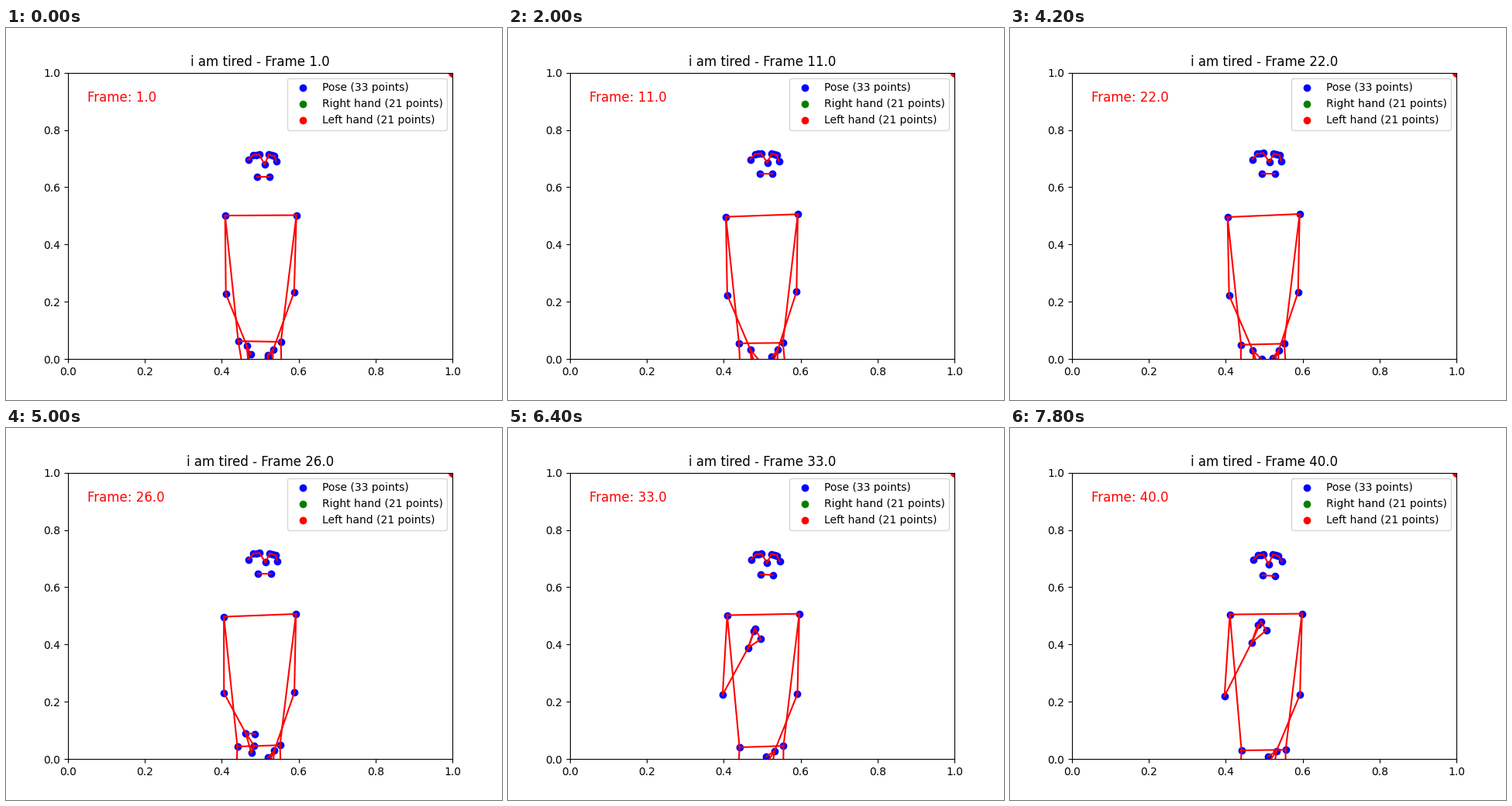
Write a matplotlib script that moves like this. It is 640 px wide and 480 px high and loops after 8 s.

```python
import numpy as np
import matplotlib.pyplot as plt
from matplotlib.animation import FuncAnimation

FRAMES, INTERVAL = 40, 200
STEPS = np.arange(FRAMES)


def ramp(a, b):
    """Smooth rise from 0 to 1 between steps a and b."""
    u = np.clip((STEPS - a) / (b - a), 0, 1)
    return u * u * (3 - 2 * u)


def bump(r):
    """Out and back again while r rises."""
    return 4 * r * (1 - r)


# Phases of the movement
settle = ramp(0, 14)
sway = bump(settle)
sink = ramp(14, 29)
back = ramp(21, 38)
lift = ramp(22, 34)
swing = bump(lift)
bow = ramp(29, 36)
nod = settle - bow
drop = ramp(35, 39)

# Joints in stage pixels as x + yj: a rest point plus a share of each phase
J = {}

for k in range(3):
    J[f"eye_r{k}"] = 319 + 4 * k + (164.2 - .5 * k) * 1j + (1.2 - .4 * k) * lift - 1.8j * nod
    J[f"eye_l{k}"] = 339.5 + 3.6 * k + (163.3 + k) * 1j + (1.2 - 1.3j) * nod
J["ear_r"] = 313 + 170.2j + lift - .7j * nod
J["ear_l"] = 349 + 172.2j + settle + lift - .7j * nod
J["nose"] = 334 + 176j + (1 - 3j) * nod
lip = 192j - 4j * settle - 1.2j * sway + 2j * bow
J["mouth_r"] = 324 + lip + settle + lift
J["mouth_l"] = 340 + lip + 2 * settle + 1j * lift

J["shoulder_r"] = 283 + 242j + (-2 + 2j) * settle + (3 - 3.4j) * back
J["shoulder_l"] = 375 + 241.5j - (1 + 1.5j) * settle + (3 - .4j) * back
J["hip_r"] = 300 + 404j + (-2 + 2j) * settle + 2j * sway + (1 + 6j) * sink + 4j * drop
J["hip_l"] = 355 + 405j + 2j * sway + (-2 + 5.2j) * sink + 3 * lift + 5j * drop
J["knee_r"] = 316 + 500j - 17 * settle - 4 * sink
J["knee_l"] = 357 + 500j + 9 * settle - 11 * sink

# Right arm swings up in front of the chest
J["elbow_r"] = 284 + 343j + (-1 + 2j) * settle + (-6 + 1j) * lift - (1 + 6j) * swing
J["wrist_r"] = (311 + 410j + (2.5 + 6j) * settle - (1.5 + 143j) * lift
                - 7 * swing + 4j * drop)
J["thumb_r"] = (316 + 421j + (9 + 14j) * settle + 6 * sway - 17j * sink
                - (7 + 168j) * lift - 4 * swing + (2 + 4j) * drop)
J["index_r"] = (316 + 440j + (7 + 4j) * settle - (3 + 198j) * lift
                - (4 + 6j) * swing + (4 + 4j) * drop)
J["pinky_r"] = (314 + 444j + (2 + 2j) * settle + (12 - 189j) * lift
                + (-2 + 5j) * swing + (3 + 4j) * drop)

# Left arm hangs
J["elbow_l"] = 372 + 341j + (1 - 1.5j) * sway + (2.5 + 3j) * back
wrist = 345 + 415j + (2 + 1j) * settle + (3 - 1.5j) * sway + (-3 + 1j) * lift
thumb = wrist - 7 + 6.5j + (-1 + 3j) * settle + 1j * sway - (3 + 2.5j) * lift
J["wrist_l"] = wrist
J["thumb_l"] = thumb
J["index_l"] = thumb + 3j + 6j * settle + 5j * sway
J["pinky_l"] = wrist - 1 + 22j - 2 * lift - 2 * swing

CHAINS = [
    "ear_r eye_r0 eye_r1 eye_r2 nose eye_l0 eye_l1 eye_l2 ear_l",
    "mouth_r mouth_l",
    "knee_r hip_r shoulder_r shoulder_l hip_l knee_l",
    "hip_r hip_l",
]
for s in "rl":
    CHAINS += [f"shoulder_{s} elbow_{s} wrist_{s} index_{s} pinky_{s} wrist_{s}",
               f"wrist_{s} thumb_{s}"]

names = list(J)
z = np.stack([J[n] for n in names], axis=1)
poses = np.stack([(z.real - 80.3) / 496, (427.2 - z.imag) / 369.6], axis=2)
edges = []
for chain in CHAINS:
    ids = [names.index(n) for n in chain.split()]
    edges += zip(ids, ids[1:])
start, end = np.array(edges).T

fig, ax = plt.subplots(figsize=(6.4, 4.8), dpi=100)
ax.set(xlim=(0, 1), ylim=(0, 1))
dots = ax.scatter(*poses[0].T, color="blue", label="Pose (33 points)")
# Undetected hands: all their points rest in the corner
corner = np.ones(21)
ax.scatter(corner, corner, color="green", label="Right hand (21 points)")
ax.scatter(corner, corner, color="red", label="Left hand (21 points)")
bones, = ax.plot([], [], color="red")
title = ax.set_title("")
counter = ax.text(.05, .9, "", fontsize=12, color="red")
ax.legend(loc="upper right")


def draw(n):
    pose = poses[n]
    gap = np.full((len(start), 2), np.nan)
    line = np.stack([pose[start], pose[end], gap], axis=1).reshape(-1, 2)
    dots.set_offsets(pose)
    bones.set_data(*line.T)
    title.set_text(f"i am tired - Frame {n + 1:.1f}")
    counter.set_text(f"Frame: {n + 1:.1f}")
    return dots, bones, title, counter


anim = FuncAnimation(fig, draw, frames=FRAMES, interval=INTERVAL, repeat=True)
plt.show()
```
